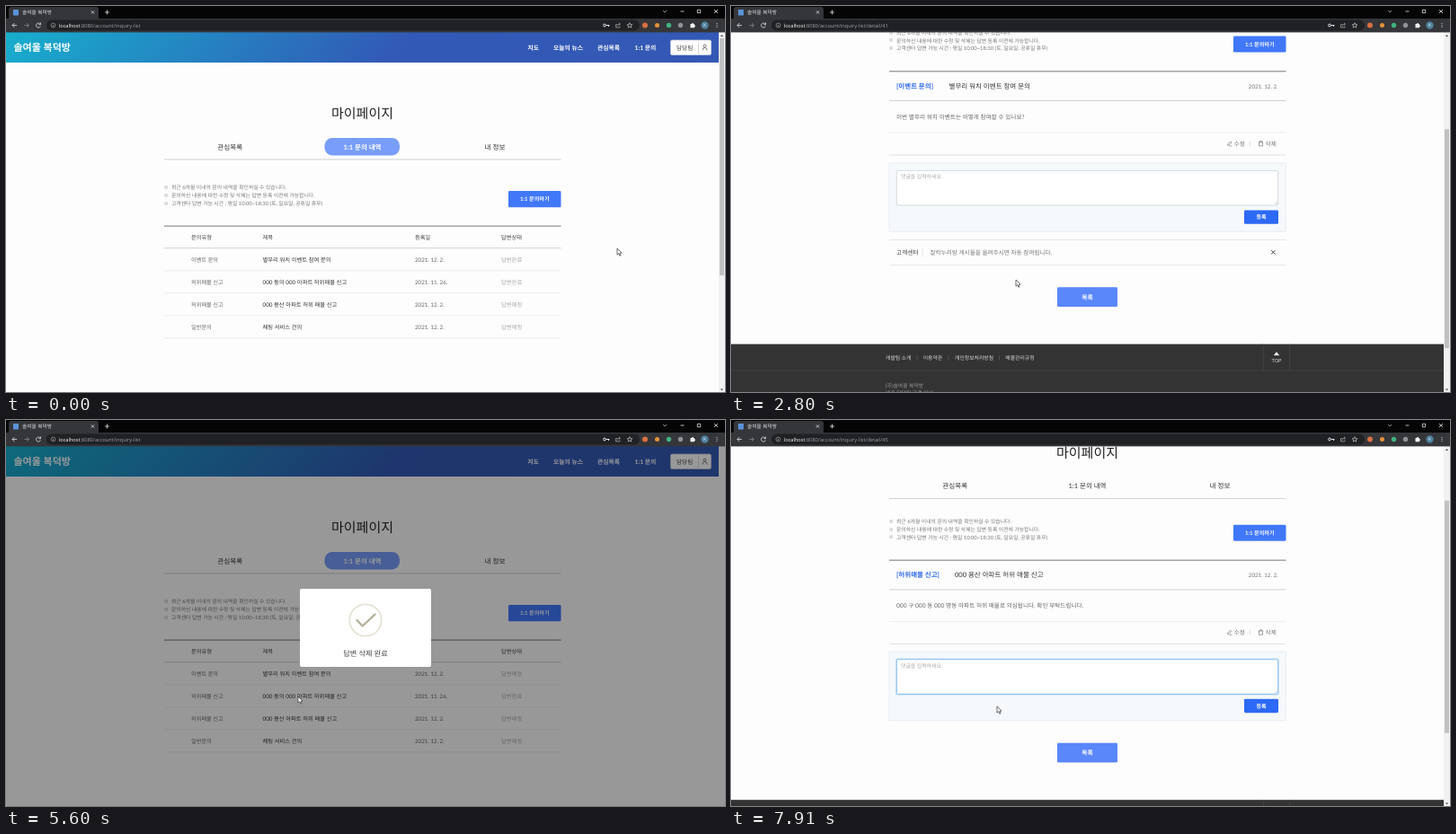
An HTML page with a canvas for the animation above (8 s loop, 800 px wide and 430 px high).

```html
<!DOCTYPE html>
<html lang="ko">
<head>
<meta charset="utf-8">
<style>
html, body { margin: 0; width: 100%; height: 100%; overflow: hidden; background: #fff; }
canvas { display: block; }
</style>
</head>
<body>
<canvas id="stage" width="800" height="430"></canvas>
<script>
const ctx = document.getElementById('stage').getContext('2d');
ctx.textRendering = 'geometricPrecision';
const LOOP = 8000, STEP = 70, LAST = 7910;
const TOP = 29, VIEW = 401, PAGE_W = 793, LEFT = 176, RIGHT = 617.5;
const BRAND = '솔여울 복덕방', USER = '담당팀';
const UI_FONT = '"Open Sans", "Noto Sans CJK KR", sans-serif';
const PAGE_FONT = 'Lato, "Noto Sans CJK KR", "Noto Sans CJK", sans-serif';

// ---- timing ----
const OPEN = 4550, CLOSE = 6050;
const NOTCH = 125 / 3; // one turn of the mouse wheel
const SCROLL = [[0, 0], [2100, 0], [2520, 4 * NOTCH], [2870, 4 * NOTCH], [3080, 3 * NOTCH],
  [4410, 3 * NOTCH], [4410, 0], [6110, 0], [6310, NOTCH], [6580, NOTCH], [6580, 0],
  [6930, 0], [7400, 2 * NOTCH]];
const POINTER = [[0, 680, 270], [350, 680, 270], [700, 333, 396], [770, 323, 385], [840, 331, 364],
  [910, 331, 364], [1260, 325, 283], [1960, 325, 283], [2520, 317, 305], [3080, 317, 305],
  [3710, 672, 366], [3990, 606, 315], [5180, 606, 315], [5600, 325, 308], [6090, 325, 308],
  [6230, 351, 319], [7000, 351, 319], [7420, 330, 285], [7770, 300, 300], [7910, 296, 319]];

const clamp = v => Math.max(0, Math.min(1, v));
function track(keys, t, column = 1) {
  let i = keys.length - 1;
  while (i > 0 && keys[i][0] > t) i--;
  const a = keys[i], b = keys[i + 1];
  if (!b) return a[column];
  const p = clamp((t - a[0]) / (b[0] - a[0]));
  return a[column] + (b[column] - a[column]) * p * p * (3 - 2 * p);
}

// ---- content ----
const ROWS = [
  ['이벤트 문의', '별무리 워치 이벤트 참여 문의', '2021. 12. 2.'],
  ['허위매물 신고', '000 동의 000 아파트 허위매물 신고', '2021. 11. 26.'],
  ['허위매물 신고', '000 용산 아파트 허위 매물 신고', '2021. 12. 2.'],
  ['일반문의', '채팅 서비스 건의', '2021. 12. 2.']
];
const NOTES = ['최근 6개월 이내의 문의 내역을 확인하실 수 있습니다.',
  '문의하신 내용에 대한 수정 및 삭제는 답변 등록 이전에 가능합니다.',
  '고객센터 답변 가능 시간 : 평일 10:00~18:30 (토, 일요일, 공휴일 휴무)'];
const DETAILS = {
  41: { row: 0, titleX: 242.5, body: '이번 별무리 워치 이벤트는 어떻게 참여할 수 있나요?',
    reply: '찰칵누리방 게시물을 올려주시면 자동 참여됩니다.' },
  45: { row: 2, titleX: 249, body: '000 구 000 동 000 명동 아파트 허위 매물로 의심됩니다. 확인 부탁드립니다.' }
};

// ---- drawing helpers ----
function text(s, x, y, size, color = '#555', weight = 400, align = 'left', family = PAGE_FONT) {
  ctx.font = `${weight} ${size}px ${family}`;
  ctx.textAlign = align;
  ctx.fillStyle = color;
  ctx.fillText(s, x, y + size * 0.36);
  return ctx.measureText(s).width;
}
function rect(x, y, w, h, color) {
  ctx.fillStyle = color;
  ctx.fillRect(x, y, w, h);
}
function box(x, y, w, h, r, fill, stroke, width = 0.7) {
  ctx.beginPath();
  ctx.roundRect(x, y, w, h, r);
  if (fill) { ctx.fillStyle = fill; ctx.fill(); }
  if (stroke) { ctx.strokeStyle = stroke; ctx.lineWidth = width; ctx.stroke(); }
}
function disc(x, y, r, fill, stroke, width) {
  box(x - r, y - r, 2 * r, 2 * r, r, fill, stroke, width);
}
function path(d, x, y, stroke, width = 0.8, fill) {
  const p = new Path2D(d);
  ctx.save();
  ctx.translate(x, y);
  if (fill) { ctx.fillStyle = fill; ctx.fill(p); }
  if (stroke) { ctx.strokeStyle = stroke; ctx.lineWidth = width; ctx.stroke(p); }
  ctx.restore();
}
const rule = (y, color, h = 0.9) => rect(LEFT, y, RIGHT - LEFT, h, color);
function button(label, x, y, w, h, color, size) {
  box(x, y, w, h, 1.3, color);
  text(label, x + w / 2, y + h / 2, size, '#fff', 700, 'center');
}

// ---- browser frame ----
function drawBrowser(url) {
  const ui = (s, x, y, size, color, align) => text(s, x, y, size, color, 400, align, UI_FONT);
  const light = '#e3e4e6';
  rect(0, 0, 800, 14, '#050506');
  box(3, 1, 100, 16, 3, '#35363a');
  rect(0, 14, 800, 15.4, '#35363a');
  rect(8, 4, 6, 6.5, '#5b93d8');
  ui(BRAND, 18, 7, 5.7, light);
  path('M-1.6-1.6L1.6 1.6M1.6-1.6L-1.6 1.6', 96.5, 7, light);
  path('M-2.5 0H2.5M0-2.5V2.5', 112.5, 7, light);
  path('M-2-1L0 1L2-1', 733, 6, light, 0.6);
  path('M-2 0H2', 752.5, 6, light);
  path('M-1.7-1.7H1.7V1.7H-1.7Z', 771, 6, light);
  path('M-2-2L2 2M2-2L-2 2', 790, 6, light);

  box(45, 15.5, 660, 12, 6, '#202124');
  path('M2.5 0H-2.5M0-2.5L-2.5 0L0 2.5', 9.5, 21.5, light);
  path('M-2.5 0H2.5M0-2.5L2.5 0L0 2.5', 23, 21.5, '#85868a');
  path('M2.2-1.2A2.5 2.5 0 1 0 2.4 1M2.5-3V-.8H.4', 36, 21.5, light);
  disc(52.5, 21.5, 2.4, null, '#bbb', 0.6);
  rect(52.2, 21, 0.7, 1.8, '#ccc');
  const host = ui('localhost', 58.8, 21.5, 5.65, '#fff');
  ui(url, 58.8 + host, 21.5, 5.65, '#9aa0a6');

  disc(666, 21.5, 1.4, null, light, 1);
  path('M1 0H5M4 0V1.5', 666.5, 21.5, light, 1);
  path('M-1-1H-2.4V2.4H2V1M-1 1Q-.5-1.4 2-1.4M1-2.7L2.5-1.4L1 0', 681, 21.5, '#ccc', 0.6);
  path('M0-2.8L.8-.8L2.9-.7L1.3.6L1.8 2.6L0 1.5L-1.8 2.6L-1.3.6L-2.9-.7L-.8-.8Z', 694, 21.5, light, 0.6);
  disc(711, 21.5, 3, '#d9703f');
  disc(724.5, 21.5, 2.5, '#e3923a');
  disc(737.5, 21.5, 2.7, '#3fb27f');
  disc(750.5, 21.5, 2.7, '#8f9195');
  path('M-2.5-1.3H-1A1 1 0 1 1 1-1.3H2V0A1 1 0 1 1 2 2V3H-2.5Z', 764, 21.3, null, 0, '#f1f1f1');
  disc(777.5, 21.5, 4.2, '#4d7f9c');
  ui('K', 777.5, 21.5, 5, '#fff', 'center');
  for (const dy of [-2, 0, 2]) disc(791, 21.5 + dy, 0.6, light);
}

// ---- page ----
function drawHeader() {
  const g = ctx.createLinearGradient(189.7, -160.7, 603.2, 252.7);
  g.addColorStop(0, '#17afcd');
  g.addColorStop(0.55, '#3259b6');
  g.addColorStop(1, '#3459b5');
  rect(0, TOP, PAGE_W, 34, g);
  text(BRAND, 8.5, 46.5, 11, '#fff', 700);
  text('지도', 580.5, 46.5, 6.8, '#fff', 700);
  text('오늘의 뉴스', 609, 46.5, 6.8, '#fff', 700);
  text('관심목록', 658, 46.5, 6.8, '#fff', 700);
  text('1:1 문의', 699.5, 46.5, 6.8, '#fff', 700);
  box(739.5, 38, 45, 16.5, 1.5, '#fff', '#ccd3e0');
  rect(770, 38.5, 0.7, 15.5, '#ccc');
  text(USER, 746, 46.3, 6.6, '#444');
  disc(777.5, 44.5, 1.5, null, '#444', 0.7);
  path('M-2.6 2.5Q-2.4-.5 0-.5T2.6 2.5', 777.5, 47, '#444', 0.7);
}

function drawIntro(isList) {
  text('마이페이지', 396.5, 120, 15, '#222', 400, 'center');
  text('관심목록', 249.3, 156.8, 7.6, '#333', 400, 'center');
  if (isList) box(354.5, 147, 83.5, 19.5, 8.5, '#789dfa');
  text('1:1 문의 내역', 396.5, 156.8, 7.5, isList ? '#fff' : '#333', isList ? 700 : 400, 'center');
  text('내 정보', 544, 156.8, 7.6, '#333', 400, 'center');
  rule(170.5, '#ccc');
  const shift = isList ? 0 : -6;
  NOTES.forEach((note, i) => {
    const y = 202.3 + 8.8 * i + shift;
    text('※', 175.6, y, 5.3, '#777');
    text(note, 184, y, 5.83, '#777');
  });
  button('1:1 문의하기', 559, 206.1 + shift, 58.5, 18.1, '#4178fa', 6.1);
}

const rowY = i => 282.3 + 25 * i;
function drawList(rowCount, answered, hovered) {
  rule(244.6, '#777', 1);
  ['문의유형', '제목', '등록일', '답변상태'].forEach((s, i) =>
    text(s, [206, 285.5, 455, 551][i], 257.5, 6.25, '#444'));
  rule(269.3, '#ccc');
  ROWS.slice(0, rowCount).forEach(([kind, title, date], i) => {
    const y = rowY(i);
    text(kind, 206, y, 6.2, '#666');
    const w = text(title, 285.5, y, 6.3, '#333');
    if (i === hovered) rect(285.5, y + 3.2, w, 0.7, '#333');
    text(date, 455, y, 6.2, '#666');
    text(i === 1 || (i === 0 && answered) ? '답변완료' : '답변예정', 551, y, 6.3, '#aaa');
    rule(y + 12.2, '#e9e9e9', 0.8);
  });
}

function drawDetail({ row, titleX, body, reply }, focused) {
  const [kind, title, date] = ROWS[row];
  rule(239, '#777', 1);
  text(`[${kind}]`, 184, 256, 7.5, '#2f6bea', 700);
  text(title, titleX, 256, 7.5, '#333');
  text(date, 608.5, 256, 6.2, '#777', 400, 'right');
  rule(271.8, '#ccc');
  text(body, 184, 290.2, 6.62, '#666');
  rule(307.2, '#e9e9e9', 0.8);
  path('M-2 2L-1.5.2L1.2-2.5L2.4-1.3L-.3 1.5ZM0 2.6H3', 554.5, 320, '#777', 0.7);
  text('수정', 559.5, 320.2, 6.7, '#777');
  rect(577.3, 317.5, 0.6, 5.5, '#ccc');
  path('M-2.7-1.7H2.7M-1-1.7V-2.8H1V-1.7M-2-1.7V2.6H2V-1.7', 589.5, 320, '#777', 0.7);
  text('삭제', 594.5, 320.2, 6.7, '#777');
  rule(332.2, '#ddd');

  box(LEFT, 341.5, RIGHT - LEFT, 76.5, 0, '#f6f9fc', '#e3e8ee');
  if (focused) box(183.9, 349.7, 425.2, 39.4, 1.5, null, '#cfe6fa', 2);
  box(184.3, 350.1, 424.4, 38.6, 1, '#fff', focused ? '#62aae8' : '#ccc');
  text('댓글을 입력하세요.', 189, 356.8, 5.9, '#aaa');
  path('M0 0L3-3M1.7 0L3-1.3', 605, 387.7, '#999', 0.5);
  button('등록', 571, 394.2, 38, 15.3, '#2c69f5', 6.1);

  if (reply) {
    rule(426.8, '#e4e4e4');
    text('고객센터', 184, 441, 6.7, '#444');
    rect(212.7, 436, 0.7, 10, '#ddd');
    text(reply, 221.5, 441, 6.6, '#777');
    path('M-2.2-2.2L2.2 2.2M2.2-2.2L-2.2 2.2', 603.3, 441, '#333', 0.9);
    rule(455, '#e4e4e4');
  }
  button('목록', 363, reply ? 480 : 443.2, 67, 21.7, '#5a87fa', 6.8);
}

function drawFooter(y) {
  rect(0, y, PAGE_W, 122, '#333');
  rect(0, y + 29, PAGE_W, 0.8, '#444');
  ['개발팀 소개', '이용약관', '개인정보처리방침', '매물관리규정'].forEach((s, i) => {
    text(s, [172, 213.7, 249, 305.3][i], y + 15, 5.85, '#ddd');
    if (i) rect([0, 206.7, 241.7, 298.3][i], y + 12.5, 0.6, 5, '#666');
  });
  rect(592.3, y, 0.8, 29, '#454545');
  rect(621.3, y, 0.8, 29, '#454545');
  path('M-3.3 2L0-2L3.3 2Z', 607, y + 10.5, null, 0, '#eee');
  text('TOP', 607, y + 18.7, 5.6, '#ddd', 400, 'center');
  text(`(주)${BRAND}`, 172, y + 46, 5.85, '#999');
  text(`대표 ${USER} 고객 안내`, 172, y + 54.5, 5.85, '#999');
}

function drawScrollbar(scroll, height) {
  rect(PAGE_W, TOP, 7, VIEW, '#f1f1f1');
  const ratio = 387 / height;
  rect(794, 36 + scroll * ratio, 5, VIEW * ratio, '#c1c1c1');
  path('M-1.7 1L0-1L1.7 1Z', 796.5, 33, null, 0, '#555');
  path('M-1.7-1L0 1L1.7-1Z', 796.5, 427.5, null, 0, '#555');
}

function drawPopup(t) {
  const age = t - OPEN, leaving = clamp((t - CLOSE) / 150);
  const scale = track([[0, 0.7], [135, 1.05], [240, 0.95], [300, 1]], age) * (1 - leaving / 2);
  rect(0, TOP, 800, VIEW, `rgba(0,0,0,${0.4 * clamp(age / 100) * (1 - leaving)})`);
  ctx.save();
  ctx.globalAlpha = 1 - leaving;
  ctx.translate(400, 231.5);
  ctx.scale(scale, scale);
  box(-73, -43.5, 146, 87, 2, '#fff');
  disc(0, -8.5, 17.7, null, '#e6e2d6', 1.8);
  const drawn = clamp((t - 4900) / 210);
  if (drawn) {
    ctx.lineCap = 'round';
    ctx.setLineDash([28.5 * drawn, 99]);
    path('M-9.5-8.5L-3.3-2L10.5-15', 0, 0, '#b3b096', 2.3);
  }
  text('답변 삭제 완료', 0, 29, 8.2, '#444', 500, 'center');
  ctx.restore();
}

function drawPointer(x, y, isHand) {
  if (isHand) {
    path('M-.9 5V.6Q0-.6.9.6V3.4L3.9 4.1Q4.6 4.4 4.4 5.6L3.6 9.3H-.7L-3 6Q-3.2 4.6-1.8 5.2L-.9 6Z', x, y, '#222', 0.8, '#fff');
  } else {
    path('M0 0V7.2L1.7 5.7L2.9 8.3L4 7.8L2.9 5.3L5 5.1Z', x, y, '#333', 0.7, '#fff');
  }
}

function hoveredRow(t, x, y) {
  if (t >= 6160) return 2;
  if (t > OPEN) return -1;
  ctx.font = `400 6.3px ${PAGE_FONT}`;
  return ROWS.findIndex(([, title], i) =>
    Math.abs(y - rowY(i)) <= 9 && x > 285 && x < 285.5 + ctx.measureText(title).width);
}

function draw(t) {
  const id = t >= 6580 ? 45 : t >= 1890 && t < 4410 ? 41 : 0;
  const scroll = track(SCROLL, t);
  const x = track(POINTER, t, 1), y = track(POINTER, t, 2);
  const rowCount = t >= 4410 && t < 4620 ? 0 : ROWS.length;
  const footerY = id === 41 ? 543.3 : id === 45 ? 506.5 : 394.5 + 25 * rowCount;
  const popup = t >= OPEN && t < CLOSE + 150;
  const hovered = id ? -1 : hoveredRow(t, x, y);

  rect(0, 0, 800, 430, '#fefdfe');
  ctx.save();
  ctx.translate(0, -scroll);
  drawHeader();
  drawIntro(!id);
  if (id) drawDetail(DETAILS[id], t >= 7490);
  else drawList(rowCount, t < 4410, hovered);
  drawFooter(footerY);
  ctx.restore();

  if (popup) drawPopup(t);
  else drawScrollbar(scroll, footerY - TOP + 122);
  if (t >= 1400 && t < 1890) {
    rect(0, 424.5, 105, 6, '#202124');
    text('localhost:8080/account/inquiry-list/detail/41', 2, 429.3, 4.8, '#ddd', 400, 'left', UI_FONT);
  }
  drawBrowser(':8080/account/inquiry-list' + (id ? `/detail/${id}` : ''));
  drawPointer(x, y, hovered >= 0);
}

function tick(now) {
  const t = now % LOOP;
  draw(Math.min(LAST, Math.floor(t / STEP) * STEP));
  requestAnimationFrame(tick);
}
requestAnimationFrame(tick);
</script>
</body>
</html>
```
